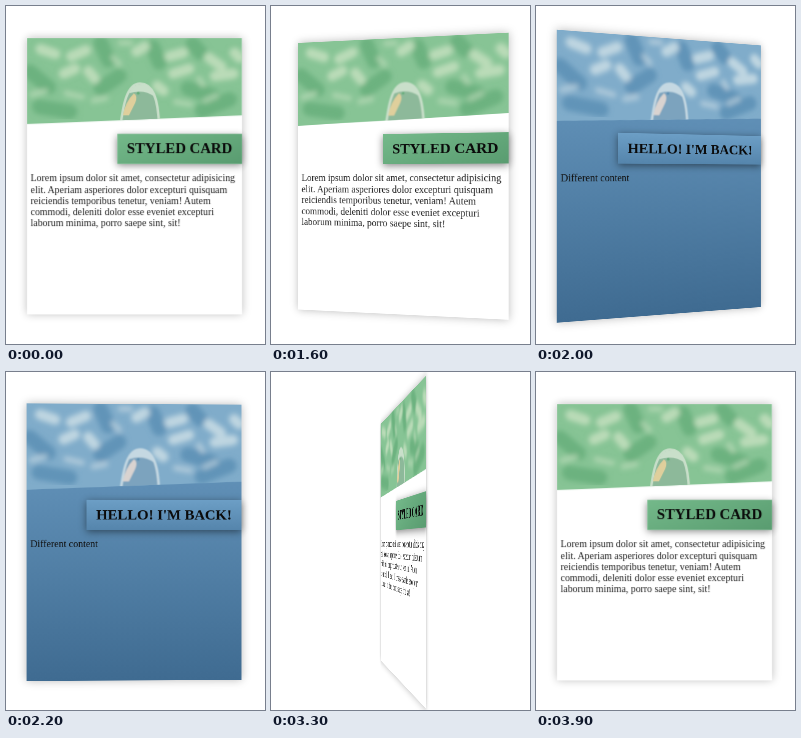
An HTML page for the animation above (4 s loop, 259 px wide and 338 px high).

```html
<!DOCTYPE html>
<html lang="en">
<head>
<meta charset="utf-8">
<title>Flip card</title>
<style>
html, body { margin: 0; width: 100%; height: 100%; overflow: hidden; background: #fff; }
.scene {
  position: absolute; left: 20.5px; top: 32px;
  width: 350px; height: 450px;
  transform: scale(.6143); transform-origin: 0 0;
  perspective: 1000px;
  font: 16px/18.5px "Liberation Serif", "Times New Roman", serif;
}
.card {
  position: absolute; inset: 0;
  transform-style: preserve-3d;
  animation: flip 4s ease infinite;
}
@keyframes flip {
  0%, 38.5% { transform: rotateY(0deg); }
  57.25%, 76.375% { transform: rotateY(-180deg); }
  95.125%, 100% { transform: rotateY(0deg); }
}
.face {
  position: absolute; inset: 0;
  backface-visibility: hidden;
  box-shadow: 0 0 14px rgba(0, 0, 0, .27);
}
.front {
  --lo: #64ac79; --mid: #87c495; --hi: #c3e0bf; --head: #8db99a; --rim: #c9dfca; --bill: #dfcf9c;
  --bar: linear-gradient(160deg, #74b98a, #599c70);
  background: #fff; color: #222;
}
.back {
  --lo: #578cb2; --mid: #80acca; --hi: #cbdde5; --head: #7ba3be; --rim: #c5d8e2; --bill: #d9d3d0;
  --bar: linear-gradient(#6c9ec5, #5585ac);
  background: linear-gradient(#6c9dc4, #3f6b91); color: #111;
  transform: rotateY(180deg);
}
.photo {
  position: absolute; left: 0; top: 0; width: 350px; height: 140px;
  clip-path: polygon(0 0, 100% 0, 100% 90%, 0 100%);
}
h2 {
  position: absolute; right: 0; top: 156px; margin: 0; padding: 0 16px;
  font-size: 24px; line-height: 49px; white-space: nowrap; color: #0a0a0a;
  background: var(--bar);
  box-shadow: 0 3px 12px rgba(0, 0, 0, .48);
}
p { position: absolute; left: 6px; top: 219px; margin: 0; white-space: nowrap; }
</style>
</head>
<body>
<svg width="0" height="0" style="position:absolute">
  <defs>
    <filter id="soft" x="-10%" y="-10%" width="120%" height="120%"><feGaussianBlur stdDeviation="4"/></filter>
    <filter id="edge"><feGaussianBlur stdDeviation="1.2"/></filter>
    <symbol id="pond" viewBox="0 0 350 140">
      <rect width="350" height="140" style="fill:var(--mid)"/>
      <g filter="url(#soft)" fill="none" stroke-linecap="round">
        <path style="stroke:var(--lo)" stroke-width="24" opacity=".75"
          d="M5 55l30 25M120 8l12 28M150 62l-30 20M205 15l10 25M262 82l40 12M330 100l-45 18M20 112l50 8M270 10l12 14"/>
        <path style="stroke:var(--hi)" stroke-width="17" opacity=".85"
          d="M22 18l24 8M72 30l24-10M60 58l18-8M100 54l10 12M178 22l14-8M232 30l22-6M238 58l26-8M296 32l20 14M306 62l30-4M212 78l10 8M338 24l8 8"/>
        <path style="stroke:var(--hi)" stroke-width="9" opacity=".6"
          d="M8 92l22-6M64 90l26 6M108 102l20-4M140 32l10 10M242 104l24 4M290 102l18-8M152 8h16M280 66l6 10"/>
      </g>
      <g filter="url(#edge)">
        <path style="fill:var(--head);stroke:var(--rim)" stroke-width="4"
          d="M152 145C156 112 162 74 184 74C205 74 214 98 215 145Z"/>
        <path style="fill:var(--rim)" d="M166 90Q172 74 188 75Q202 77 208 96Q190 82 166 90Z"/>
        <path style="fill:var(--bill)" d="M174 90Q181 94 176 106L166 126L156 126Q160 104 174 90Z"/>
        <circle cx="181" cy="90" r="2.2" style="fill:var(--lo)"/>
      </g>
    </symbol>
  </defs>
</svg>
<div class="scene">
  <div class="card">
    <section class="face front">
      <svg class="photo"><use href="#pond"/></svg>
      <h2>STYLED CARD</h2>
      <p>Lorem ipsum dolor sit amet, consectetur adipisicing<br>
        elit. Aperiam asperiores dolor excepturi quisquam<br>
        reiciendis temporibus tenetur, veniam! Autem<br>
        commodi, deleniti dolor esse eveniet excepturi<br>
        laborum minima, porro saepe sint, sit!</p>
    </section>
    <section class="face back">
      <svg class="photo"><use href="#pond"/></svg>
      <h2>HELLO! I'M BACK!</h2>
      <p>Different content</p>
    </section>
  </div>
</div>
</body>
</html>
```
